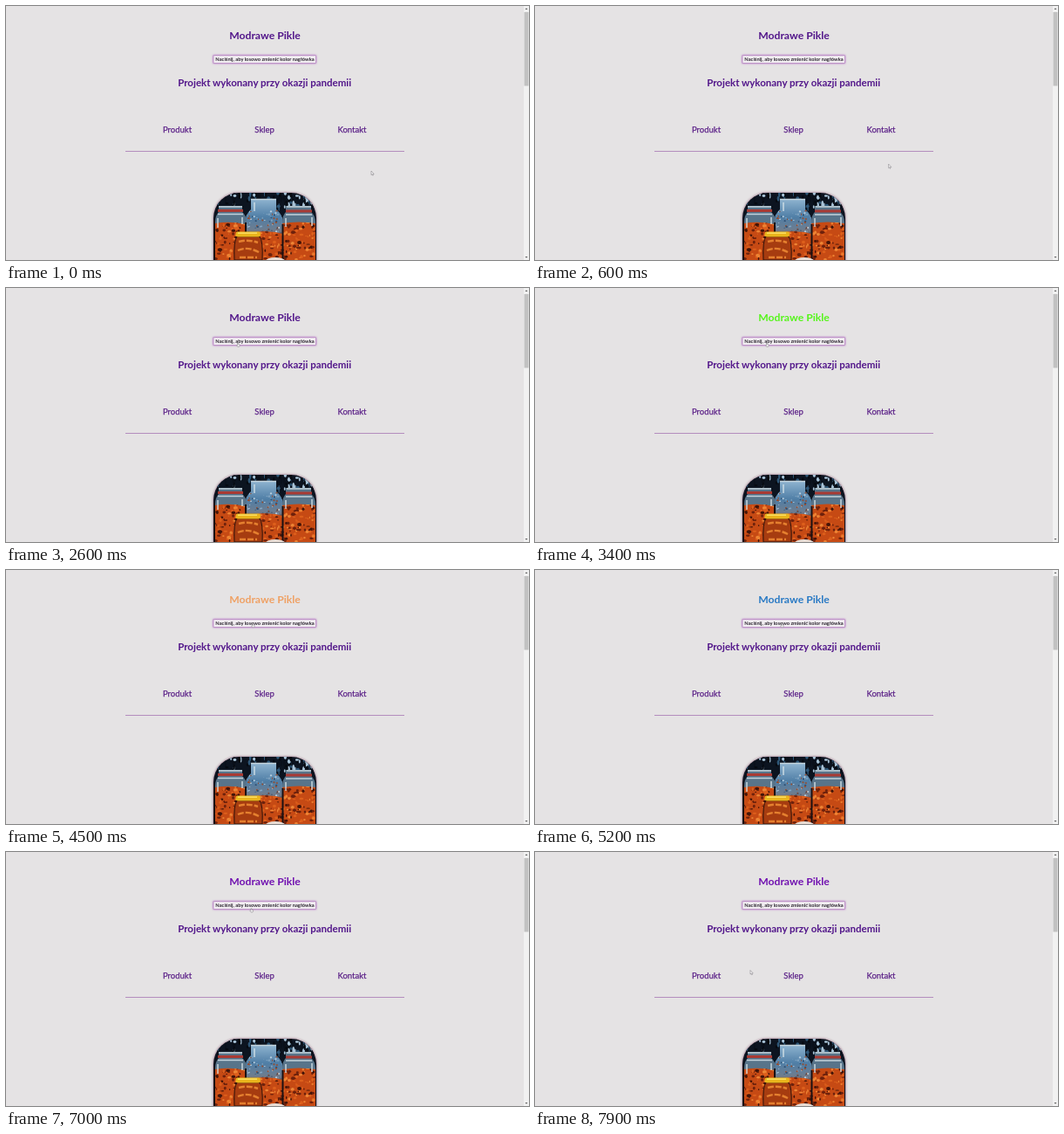
These frames come from a looping animation (600x291 px, 8 s). An HTML page:

```html
<!DOCTYPE html>
<html lang="pl">
<head>
<meta charset="utf-8">
<title>Modrawe Pikle</title>
<style>
  html, body { margin: 0; width: 100%; height: 100%; overflow: hidden; background: #e5e3e4; }
  svg { display: block; width: 600px; height: 291px; font-family: Lato, sans-serif; }
  text { text-anchor: middle; }
  .bold { font-weight: 700; }
  .nav { font-size: 9.5px; fill: #5c2288; stroke: #5c2288; stroke-width: .25px; }
  .button { filter: drop-shadow(0 0 1px #b05cc4); }
  .photo { filter: drop-shadow(0 .5px 1.5px #80506a); }
</style>
</head>
<body>
<svg viewBox="0 0 600 291">
  <defs>
    <clipPath id="frame"><rect x="238" y="214" width="118" height="118" rx="29"/></clipPath>
    <clipPath id="kimchi">
      <path id="fill" d="M240 249Q256 246 275 250V291H240ZM274 262Q295 255 318 261V291H274ZM317 249Q336 246 355 249V291H317Z"/>
    </clipPath>
    <clipPath id="bottle"><path id="glass" d="M281 221H310V233Q318 239 318 250V291H274V250Q274 239 281 233Z"/></clipPath>
    <linearGradient id="blue" x2="0" y2="1">
      <stop stop-color="#8fb4d0"/><stop offset=".3" stop-color="#4f7ea6"/>
      <stop offset=".5" stop-color="#6d7d90"/><stop offset=".7" stop-color="#8d4a30"/>
    </linearGradient>
  </defs>

  <rect width="600" height="291" fill="#e5e3e4"/>

  <text id="title" class="bold" x="297" y="38" font-size="12.2">Modrawe Pikle</text>
  <rect class="button" x="238" y="56.8" width="117.5" height="8.6" fill="#f2eef2" stroke="#b384bd" stroke-width=".7"/>
  <text class="bold" x="297" y="63" font-size="5.75" fill="#2c2630">Naciśnij, aby losowo zmienić kolor nagłówka</text>
  <text class="bold" x="296.7" y="92.4" font-size="11.5" fill="#52168a">Projekt wykonany przy okazji pandemii</text>

  <g class="nav">
    <text x="196.5" y="145">Produkt</text>
    <text x="296.6" y="145">Sklep</text>
    <text x="397" y="145">Kontakt</text>
  </g>
  <rect x="137" y="166" width="320" height="1" fill="#b48dbe"/>

  <g class="photo"><g clip-path="url(#frame)">
    <rect x="238" y="214" width="118" height="80" fill="#0c1420"/>
    <g id="trees"></g>
    <use href="#glass" fill="url(#blue)"/>
    <g id="drops" clip-path="url(#bottle)"></g>
    <path d="M244 229H271V236Q276 240 276 248V291H240V248Q240 240 244 236Z" fill="#58748a"/>
    <path d="M321 229H350V236Q355 240 355 248V291H317V248Q317 240 321 236Z" fill="#58748a"/>
    <use href="#fill" fill="#c64a14"/>
    <g id="pieces" clip-path="url(#kimchi)"></g>
    <path d="M244 230H271M243 238.5H272M322 230H350M321 239H351M281 221.5H310" stroke="#c3d3dc" stroke-width="1.7"/>
    <path d="M243 234.5H272M321 235H351" stroke="#a83a34" stroke-width="3"/>
    <path d="M243 243V254M271 242V250M321 243V253M351 242V252M285 225V235" stroke="#d8e5ea" stroke-width="1.3"/>
    <path d="M275 248V291M317.5 250V291M239 246V291" stroke="#1b1012" stroke-width="2"/>
    <path d="M265 264H291Q295 269 294 291H262Q261 269 265 264Z" fill="#a63c10" stroke="#2b100a"/>
    <path d="M267 270Q277 267 289 271M266 280Q277 275 290 282M268 288H288" stroke="#e5802f" stroke-width="2.4" stroke-dasharray="7 2" fill="none"/>
    <rect x="263.5" y="258.5" width="28.5" height="6" rx="2.4" fill="#e9b51c"/>
    <path d="M266 260.2H288" stroke="#ffe873" stroke-width="1.3"/>
    <ellipse cx="309" cy="292" rx="11" ry="4" fill="#e8dcd4"/>
  </g></g>

  <rect x="594" width="6" height="291" fill="#f1f1f1"/>
  <rect x="594.5" y="7" width="5" height="84.5" fill="#c1c1c1"/>
  <path d="M595.5 4L597 2.3L598.5 4ZM595.5 287L597 288.7L598.5 287Z" fill="#606060"/>

  <g id="cursor" fill="#f6f4f6" stroke="#6f6c70" stroke-width=".45" stroke-linejoin="round">
    <path id="arrow" d="M0 0V4.6L1 3.7L1.7 5.2L2.4 4.9L1.8 3.4H3.2Z"/>
    <path id="hand" d="M0 0Q.5-.5 .9 0V1.4L2.6 1.8V3.2L2.1 4.2H.1L-1 2.6L-.5 2.1L0 2.5Z"/>
  </g>
</svg>
<script>
const LOOP = 8000;
const $ = id => document.getElementById(id);

// time, x, y
const moves = [
  [0, 419, 189], [200, 419, 189], [900, 397, 176], [1400, 153, 98],
  [1800, 195, 66], [2400, 265.5, 63], [3500, 265.5, 63],
  [4300, 282.5, 61.5], [6900, 282.5, 61.5], [7700, 247, 135.5], [LOOP, 247, 135.5]
];
const colors = [
  [0, '#52168a'], [3300, '#55f51a'], [4200, '#efa063'],
  [5100, '#2879c4'], [6000, '#1d8b68'], [6900, '#7010b0']
];

let seed = 7;
const random = (min, max) => {
  seed = (seed * 16807) % 2147483647;
  return min + (max - min) * seed / 2147483647;
};
const scatter = (id, count, palette, [x0, x1], [y0, y1], [w0, w1], [h0, h1]) => {
  let shapes = '';
  for (let i = 0; i < count; i++) {
    const x = random(x0, x1), y = random(y0, y1);
    shapes += `<ellipse cx="${x}" cy="${y}" rx="${random(w0, w1)}" ry="${random(h0, h1)}" fill="${palette[i % palette.length]}"/>`;
  }
  $(id).innerHTML = shapes;
};
scatter('trees', 90, ['#a9c4d8', '#0a101a', '#2f5878', '#060a10'], [238, 356], [213, 232], [.7, 2.2], [1, 5]);
scatter('drops', 90, ['#b9cfdf', '#2c4d70', '#7fa3c0', '#9a4a28'], [274, 318], [234, 264], [.4, 1.3], [.4, 1.2]);
scatter('pieces', 240, ['#ee8434', '#6d210c', '#dd5f1c', '#431408'], [240, 355], [247, 291], [.6, 2.6], [.5, 2]);

function draw(time) {
  const t = time % LOOP;
  const next = moves.findIndex(m => m[0] > t);
  const [t0, x0, y0] = moves[next - 1], [t1, x1, y1] = moves[next];
  const p = (t - t0) / (t1 - t0), eased = p * p * (3 - 2 * p);
  const x = x0 + (x1 - x0) * eased, y = y0 + (y1 - y0) * eased;
  const hovering = x > 237 && x < 356 && y > 56 && y < 66;

  $('cursor').setAttribute('transform', `translate(${x} ${y})`);
  $('arrow').style.display = hovering ? 'none' : '';
  $('hand').style.display = hovering ? '' : 'none';
  $('title').setAttribute('fill', colors.findLast(c => c[0] <= t)[1]);
}

const start = performance.now();
function tick() {
  draw(performance.now() - start);
  requestAnimationFrame(tick);
}
tick();
</script>
</body>
</html>
```
